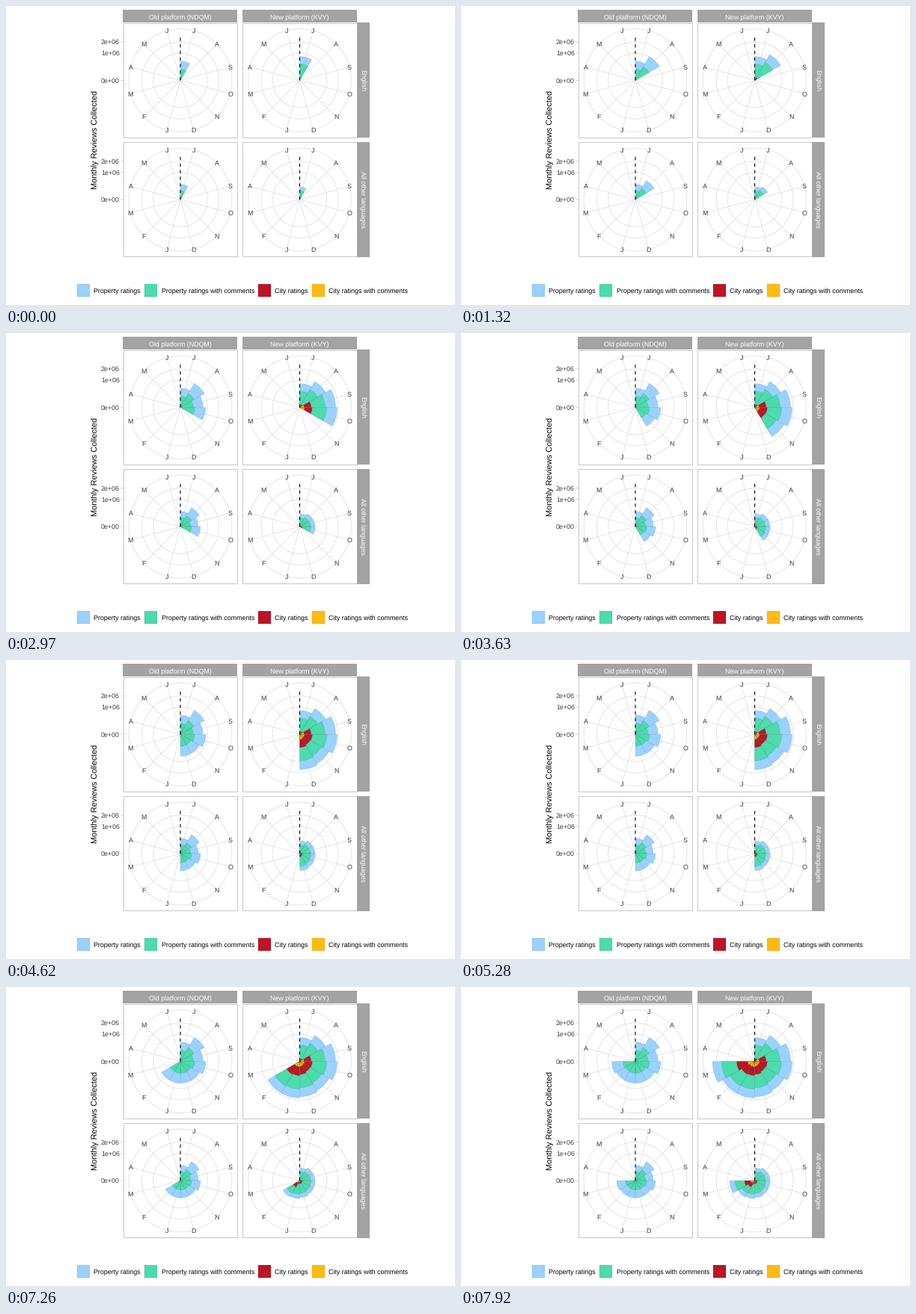
Write a matplotlib script that moves like this. It is 600 px wide and 400 px high and loops after 8 s.

```python
import math

import matplotlib.pyplot as plt
import numpy as np
from matplotlib.animation import FuncAnimation
from matplotlib.collections import LineCollection, PatchCollection
from matplotlib.patches import Circle, Rectangle, Wedge

plt.rcParams["font.family"] = "Liberation Sans"
plt.rcParams["text.hinting"] = "none"

W, H, DPI = 600, 400, 100
LOOP, STEP = 8000, 20
PT = 72 / DPI
FIRST, PERIOD = 660, 990          # second month appears, then one per period

STRIP, BORDER, GRID, INK = "#a3a3a3", "#c6c6c6", "#e2e2e2", "#404040"
EDGE = (0, 0, 0, 0.2)
COLORS = ("#99d1ff", "#4cdbac", "#bd1426", "#ffbb10")
MONTHS = "JASONDJFMAMJ"
SHOWN = 9
R_OUT, R_DATA, R_MILLION = 68.9, 61.3, 36.4
COLS, ROWS = (233.0, 392.5), (99.5, 259.0)

fig = plt.figure(figsize=(W / DPI, H / DPI), dpi=DPI, facecolor="white")
ax = fig.add_axes([0, 0, 1, 1])
ax.set_xlim(0, W)
ax.set_ylim(H, 0)
ax.axis("off")


def curve(*points):
    """Value for every month, linear between (month, value) key points."""
    return np.interp(np.arange(SHOWN), *zip(*points))


def panel_radii():
    """Radii by (column, row): all ratings first, then nested shares."""
    k = np.arange(SHOWN)
    none = np.zeros(SHOWN)
    old = curve((0, 0.85), (1, 1.22), (2, 1), (3, 1.12), (4, 0.97), (7, 0.96),
                (8, 1.04))
    english = curve((0, 32), (2, 48), (3, 50), (4, 45.4), (6, 49), (7, 49.2),
                    (8, 56.5))
    other = curve((0, 17), (1, 19.8), (4, 21.3), (7, 25.6), (8, 33.5))
    city_english = curve((0, 0), (1, 0.35), (2, 1))
    city_other = curve((2, 0), (3, 0.48), (6, 0.48), (7, 0.95))

    def old_panel(total):
        return total, total * (0.58 - 0.007 * k), none, none

    def new_panel(total, uptake):
        city = total * (0.28 + 0.018 * k) * uptake
        return total, total * (0.68 + 0.013 * k), city, 0.38 * city

    return {(0, 0): old_panel(30.3 * old), (0, 1): old_panel(24 * old),
            (1, 0): new_panel(english, city_english),
            (1, 1): new_panel(other, city_other)}


def label(x, y, s, size=8.85, color=INK, ha="center", rot=0):
    """Place text so that its capitals are centred on (x, y)."""
    drop = 0.36 * size
    a = math.radians(rot)
    ax.text(x + drop * math.sin(a), y + drop * math.cos(a), s,
            fontsize=size * PT, color=color, ha=ha, va="baseline",
            rotation=rot, rotation_mode="anchor", zorder=6)


def box(x0, y0, x1, y1, fill, edge="none", lw=0.0):
    ax.add_patch(Rectangle((x0, y0), x1 - x0, y1 - y0, facecolor=fill,
                           edgecolor=edge, linewidth=lw * PT, zorder=3))


def polar(cx, cy, r, deg):
    """Point at a clockwise angle from twelve o'clock."""
    a = math.radians(deg)
    return cx + r * math.sin(a), cy - r * math.cos(a)


def lines(segments, color, lw, z, style="solid"):
    ax.add_collection(LineCollection(segments, colors=color, linewidths=lw * PT,
                                     linestyles=style, zorder=z, snap=False,
                                     capstyle="butt"), autolim=False)


circles, spokes, dashes, ticks = [], [], [], []
for cx in COLS:
    for cy in ROWS:
        circles += [Circle((cx, cy), r)
                    for r in (R_MILLION, R_MILLION * math.sqrt(2), R_OUT)]
        for k, name in enumerate(MONTHS):
            tip = polar(cx, cy, R_OUT, 15 + 30 * k)
            spokes.append([(cx, cy), tip])
            label(*tip, name)
        dashes.append([(cx, cy), (cx, cy - R_DATA)])
        box(cx - 76.5, cy - 77, cx + 76.4, cy + 76, "none", BORDER, 1)

ax.add_collection(PatchCollection(circles, facecolor="none", edgecolor=GRID,
                                  linewidth=0.9 * PT, zorder=1), autolim=False)
lines(spokes, GRID, 0.9, 1)
lines(dashes, "black", 1.1, 5, (0, (4, 4)))

for cy in ROWS:
    for millions in range(3):
        y = cy - R_MILLION * math.sqrt(millions)
        label(151.8, y, f"{millions}e+06" if millions else "0e+00", ha="right")
        ticks.append([(153.6, y), (156.4, y)])
lines(ticks, BORDER, 0.9, 3)

for cx, title in zip(COLS, ("Old platform (NDQM)", "New platform (KVY)")):
    box(cx - 77, 5, cx + 76.4, 22.4, STRIP)
    label(cx, 14.6, title, color="white")
for cy, title in zip(ROWS, ("English", "All other languages")):
    box(469, cy - 77.3, 486, cy + 76.6, STRIP)
    label(477.2, cy, title, color="white", rot=-90)
label(118.8, 179.3, "Monthly Reviews Collected", 11, "black", rot=90)

LEGEND = ((94.6, "Property ratings"), (185, "Property ratings with comments"),
          (336.6, "City ratings"), (408.8, "City ratings with comments"))
for (x, text), color in zip(LEGEND, COLORS):
    box(x, 372, x + 17.2, 389.2, color, EDGE, 0.4)
    label(x + 22.6, 380.9, text, color="black", ha="left")

RADII = panel_radii()


def month_sector(k):
    """All wedges of month k in the four panels."""
    wedges, fills = [], []
    for (col, row), series in RADII.items():
        for radii, color in zip(series, COLORS):
            if radii[k] > 0:
                wedges.append(Wedge((COLS[col], ROWS[row]), radii[k],
                                    30 * k - 90, 30 * k - 60))
                fills.append(color)
    return ax.add_collection(
        PatchCollection(wedges, facecolors=fills, edgecolors=[EDGE],
                        linewidths=0.4 * PT, zorder=4), autolim=False)


sectors = [month_sector(k) for k in range(SHOWN)]


def update(i):
    t = (i + 1) * STEP - 1
    count = 1 + (t + PERIOD - FIRST) // PERIOD
    for k, sector in enumerate(sectors):
        sector.set_visible(k < count)
    return sectors


def reset():
    return update(0)


anim = FuncAnimation(fig, update, frames=LOOP // STEP, init_func=reset,
                     interval=STEP, repeat=True, repeat_delay=0, blit=False)
plt.show()
```
